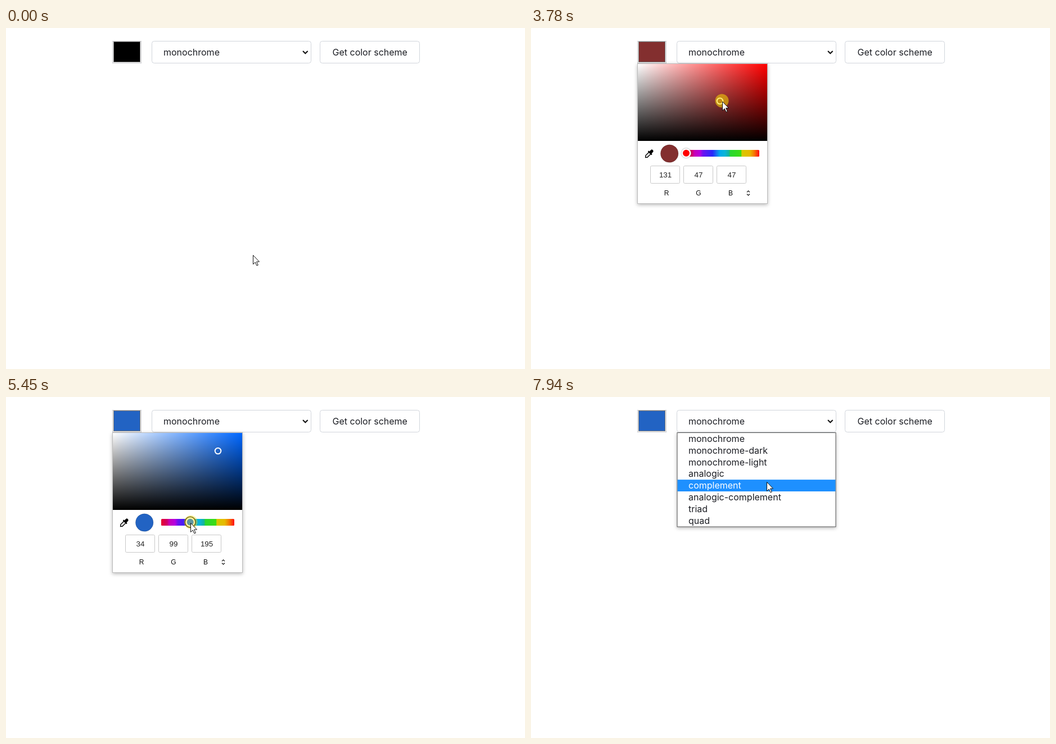
Recreate the animation shown at these times as an HTML page. Size 923 px wide and 607 px high, loop 8 s.

```html
<!DOCTYPE html>
<html lang="en">
<head>
<meta charset="utf-8">
<title>Color scheme picker</title>
<style>
  html, body { margin: 0; width: 100%; height: 100%; overflow: hidden; background: #fff; }
  svg { display: block; width: 923px; height: 607px; }
  text { font: 16px Inter, sans-serif; fill: #1c1e24; }
  .small text { font: 13.33px "Liberation Sans", Arial, sans-serif; fill: #222; text-anchor: middle; }
  .small .label { font-size: 12px; fill: #111; }
  .control { fill: #fff; stroke: #d1d5db; }
  .popup { filter: drop-shadow(0 2px 3px rgba(0, 0, 0, .28)); }
  .line { fill: none; stroke: #111; }
  .cursor { fill: #fff; stroke: #111; stroke-linejoin: round; }
</style>
</head>
<body>
<svg viewBox="0 0 923 607">
  <defs>
    <linearGradient id="tint">
      <stop offset="0" stop-color="#fff"/>
      <stop id="pureStop" offset="1" stop-color="#f00"/>
    </linearGradient>
    <linearGradient id="shade" x2="0" y2="1">
      <stop offset="0" stop-color="#000" stop-opacity="0"/>
      <stop offset="1" stop-color="#000"/>
    </linearGradient>
    <linearGradient id="spectrum">
      <stop offset="0" stop-color="#e6002d"/>
      <stop offset=".08" stop-color="#d00068"/>
      <stop offset=".11" stop-color="#c800b4"/>
      <stop offset=".19" stop-color="#b400e0"/>
      <stop offset=".23" stop-color="#6a12f0"/>
      <stop offset=".36" stop-color="#2828fa"/>
      <stop offset=".42" stop-color="#1478f0"/>
      <stop offset=".46" stop-color="#00aaeb"/>
      <stop offset=".53" stop-color="#0ab4d7"/>
      <stop offset=".59" stop-color="#14b496"/>
      <stop offset=".6" stop-color="#28d732"/>
      <stop offset=".75" stop-color="#3cdc14"/>
      <stop offset=".76" stop-color="#d7c800"/>
      <stop offset=".87" stop-color="#e6b900"/>
      <stop offset=".93" stop-color="#f57800"/>
      <stop offset="1" stop-color="#ff0a14"/>
    </linearGradient>
  </defs>

  <rect class="control" x="189.5" y="23.5" width="51" height="39" style="stroke:#c9c9cc"/>
  <rect id="swatch" x="191.5" y="24.5" width="47" height="36" stroke="#777"/>
  <rect class="control" x="259.5" y="23.5" width="283" height="39" rx="4"/>
  <text x="280" y="49">monochrome</text>
  <path class="line" stroke-width="2" d="M528 41l4.3 4.3l4.3-4.3"/>
  <rect class="control" x="558.5" y="23.5" width="177" height="39" rx="4"/>
  <text x="580.5" y="49">Get color scheme</text>

  <g id="picker">
    <rect class="popup" x="189.5" y="63.5" width="231" height="249" fill="#fff" stroke="#bbb"/>
    <rect x="190" y="64" width="230" height="137" fill="url(#tint)"/>
    <rect x="190" y="64" width="230" height="137" fill="url(#shade)"/>
    <g transform="translate(210 224) rotate(45)">
      <rect x="-2.7" y="-9.5" width="5.4" height="7.5" rx="2.5"/>
      <rect x="-4.5" y="-3.6" width="9" height="2.4" rx=".6"/>
      <path class="line" stroke-width="1.5" d="M-2.2-1.5V6.5L0 9L2.2 6.5V-1.5"/>
    </g>
    <circle id="preview" cx="246.2" cy="223.5" r="15.8" stroke="#000" stroke-opacity=".15"/>
    <rect x="276" y="217" width="130" height="12" rx="1.5" fill="url(#spectrum)"/>
    <g class="small" id="fields"></g>
    <path class="line" stroke-width="1.2" d="M384 292.3l2.5-2.5l2.5 2.5M384 295.5l2.5 2.5l2.5-2.5"/>
    <circle id="handle" r="5.3" fill="none" stroke="#fff" stroke-width="2"/>
    <g id="knob">
      <circle id="knobRing" r="9.3" fill="none" stroke="#101010" stroke-width="1.8"/>
      <circle id="knobFill" r="7.2" stroke="#fff" stroke-width="2.4" style="filter:drop-shadow(0 0 1px #888)"/>
    </g>
  </g>

  <g id="menu">
    <rect class="popup" x="260" y="63.5" width="282" height="167.5" fill="#fff" stroke="#555"/>
    <rect id="highlight" x="260.5" width="281" height="20.9" fill="#1e90ff"/>
  </g>

  <circle id="press" r="12" fill="#ffe100"/>
  <path id="arrow" class="cursor" d="M.5 .5V16.5L4.2 13L7 19L9.3 18L6.6 12H11.5Z"/>
  <path id="hand" class="cursor" d="M-2 2Q-2 0 0 0Q2 0 2 2V7Q4 6 5.5 7.8Q7.5 7 8.6 8.8Q11 8 11.5 10.5V15Q11.5 18 9.5 22H-1.5Q-3 18-6.5 14Q-7.5 11-4.5 11.5L-2 13.5ZM2 7V11M5.5 8V11.5M8.6 9V12"/>
</svg>

<script>
const LOOP = 8000, ROW = 20.86;
const $ = id => document.getElementById(id);

// Each move: first step, last step, step count, end x, y, optional curve control x, y
const cursorMoves = [
  [390, 1170, 13, 232, 97],
  [1240, 1570, 6, 219.5, 41.5],
  [2220, 2970, 12, 201, 194, 270, 110],
  [3030, 3100, 2, 191, 197],
  [3170, 3780, 10, 340, 130.5, 400, 140],
  [3850, 4190, 6, 377, 97],
  [4260, 4590, 6, 279, 224],
  [4790, 4920, 3, 292.5, 224.5],
  [4990, 5450, 8, 328, 224],
  [5650, 6310, 11, 396, 44],
  [6370, 6570, 4, 450, 43, 420, 66],
  [7290, 7940, 11, 419, 151]
];
const handleMoves = [
  [3170, 3780, 10, 336, 130, 396, 139],
  [3850, 4190, 6, 377, 96]
];
const knobMoves = [
  [4790, 4920, 3, 289.62, 222.7],
  [4990, 5450, 8, 327.68, 222.7]
];
const presses = [[1900, 2030], [3030, 4260], [4660, 5520], [6760, 6900]];

const within = (t, [a, b]) => t >= a && t < b;
const show = (id, on) => $(id).style.display = on ? '' : 'none';
const place = (id, x, y) => $(id).setAttribute('transform', `translate(${x} ${y})`);

function track(start, moves, t) {
  let [px, py] = start;
  for (const [a, b, n, x, y, cx = (px + x) / 2, cy = (py + y) / 2] of moves) {
    if (t < a) break;
    const step = t >= b ? n : Math.floor((t - a) / (b - a) * (n - 1) + .08) + 1;
    const p = step / n, e = p * p * (3 - 2 * p);
    const curve = (from, via, to) => (1 - e) ** 2 * from + 2 * e * (1 - e) * via + e * e * to;
    [px, py] = [curve(px, cx, x), curve(py, cy, y)];
  }
  return [px, py];
}

function hsv(h, s, v) {
  return [5, 3, 1].map(n => {
    const k = (n + h / 60) % 6;
    return Math.round(255 * v * (1 - s * Math.max(0, Math.min(k, 4 - k, 1))));
  });
}
const css = rgb => `rgb(${rgb.join()})`;

function add(parent, tag, attrs, content = '') {
  const el = document.createElementNS('http://www.w3.org/2000/svg', tag);
  for (const name in attrs) el.setAttribute(name, attrs[name]);
  el.textContent = content;
  return parent.appendChild(el);
}

const values = ['R', 'G', 'B'].map((name, i) => {
  const x = 239 + i * 59;
  add($('fields'), 'rect', { x: x - 26.5, y: 245.5, width: 52, height: 31, rx: 2, fill: '#fff', stroke: '#c8c8c8' });
  add($('fields'), 'text', { x: 241 + i * 57, y: 298, class: 'label' }, name);
  return add($('fields'), 'text', { x, y: 266 });
});

const options = ['monochrome', 'monochrome-dark', 'monochrome-light', 'analogic',
  'complement', 'analogic-complement', 'triad', 'quad']
  .map((name, i) => add($('menu'), 'text', { x: 280, y: 79.8 + i * ROW }, name));

function draw(t) {
  const [x, y] = track([439, 404], cursorMoves, t);
  const [hx, hy] = track([190, 200], handleMoves, t);
  const [kx, ky] = track([276, 222.7], knobMoves, t);
  const hue = 360 - (kx - 276) / 129 * 360;
  const rgb = hsv(hue, (hx - 190) / 227, 1 - (hy - 64) / 136);
  const pure = css(hsv(hue, 1, 1));

  $('swatch').style.fill = $('preview').style.fill = css(rgb);
  $('pureStop').style.stopColor = $('knobFill').style.fill = pure;
  values.forEach((el, i) => el.textContent = rgb[i]);
  place('handle', hx, hy);
  place('knob', kx, ky);
  show('knobRing', t >= 4660);
  show('picker', within(t, [1960, 6760]));

  const row = Math.max(0, Math.floor((y - 63.7) / ROW));
  show('menu', t >= 6760);
  $('highlight').setAttribute('y', 63.7 + row * ROW);
  options.forEach((el, i) => el.style.fill = i === row ? '#fff' : '');

  const onHue = within(t, presses[2]);
  show('press', presses.some(span => within(t, span)));
  $('press').style.opacity = onHue ? .38 : .53;
  place('press', onHue ? kx + 1 : x - .5, onHue ? ky : y - 1);

  const overSwatch = x < 241 && y < 63;
  show('hand', overSwatch);
  show('arrow', !overSwatch);
  place(overSwatch ? 'hand' : 'arrow', x, y);
}

const begin = performance.now();
function tick() {
  draw((performance.now() - begin) % LOOP);
  requestAnimationFrame(tick);
}
tick();
</script>
</body>
</html>
```
